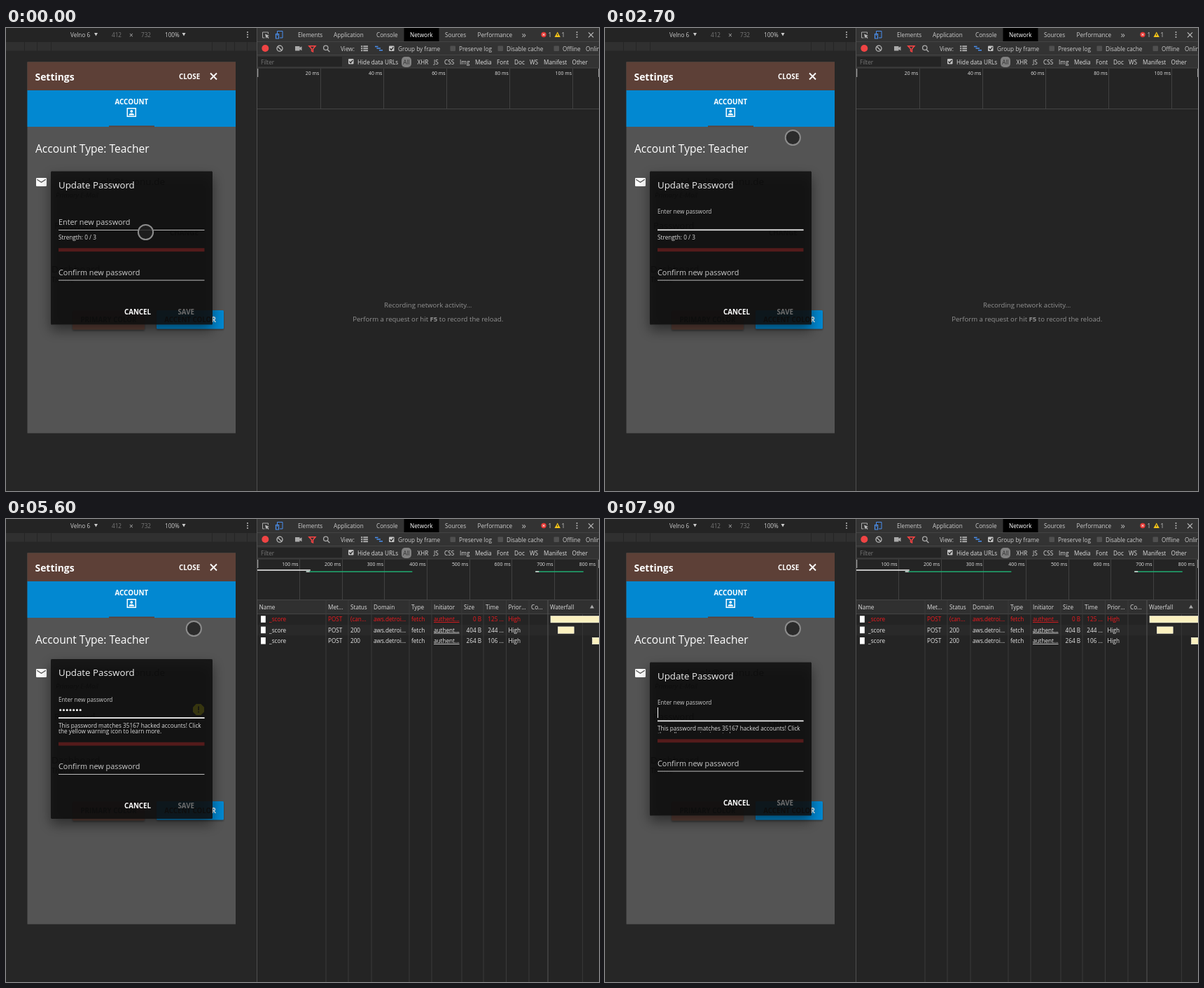
Recreate the animation shown at these times as an HTML page. Size 847 by 661 pixels, loop 8 s.

```html
<!DOCTYPE html>
<html lang="en">
<head>
<meta charset="utf-8">
<title>Password settings</title>
<style>
html, body { margin: 0; width: 100%; height: 100%; overflow: hidden; background: #262626; }
svg { display: block; width: 847px; height: 661px; }
text { font-family: "Open Sans", "Noto Sans", sans-serif; white-space: pre; }
</style>
</head>
<body>
<svg id="stage" viewBox="0 0 847 661" xmlns="http://www.w3.org/2000/svg"></svg>
<script>
const LOOP = 8000;
const text = (x, y, s, size = 8.2, fill = '#ccc', more = '') =>
  `<text x="${x}" y="${y}" font-size="${size}" fill="${fill}" ${more}>${s}</text>`;
const rect = (x, y, w, h, fill, more = '') =>
  `<rect x="${x}" y="${y}" width="${w}" height="${h}" fill="${fill}" ${more}/>`;
const path = (d, stroke, width = 1, more = '') =>
  `<path d="${d}" stroke="${stroke}" stroke-width="${width}" fill="none" ${more}/>`;
const shape = (d, fill) => `<path d="${d}" fill="${fill}"/>`;
const circle = (x, y, r, fill, more = '') => `<circle cx="${x}" cy="${y}" r="${r}" fill="${fill}" ${more}/>`;
const vline = (x, y0, y1, color) => rect(x, y0, 1, y1 - y0, color);
const bold = 'font-weight="700"';
const end = 'text-anchor="end"';
const middle = 'text-anchor="middle"';
const kebab = (x, y) => [-3.6, 0, 3.6].map(d => circle(x, y + d, 1, '#bbb')).join('');
const caretDown = (x, y) => shape(`M${x} ${y}h5l-2.5 4.5z`, '#ccc');
const checkbox = (x, y, on) => rect(x, y, 7.5, 7.5, on ? '#c4c4c4' : '#505050', 'rx="1"') +
  (on ? path(`M${x + 1.5} ${y + 3.8}l1.8 2 3-4`, '#222', 1.3) : '');

function deviceBar() {
  return rect(0, 0, 358, 20, '#242424') + text(92, 12.5, 'Velno 6') + caretDown(126, 7) +
    text(151, 12.5, '412', 8.2, '#777') + text(176, 13.5, '×', 10, '#aaa') + text(193, 12.5, '732', 8.2, '#777') +
    text(227, 12.5, '100%') + caretDown(251.5, 7) + kebab(345, 9.5) +
    rect(0, 20, 358, 12.5, '#303030') +
    [26, 44, 64, 294, 314, 326, 344].map(x => vline(x, 20, 32.5, '#252525')).join('');
}

function phone() {
  const ghost = (x, y, s, size, more) => text(x, y, s, size, '#000', more);
  return rect(30.5, 48.5, 297.5, 530, '#545454') +
    rect(30.5, 48.5, 297.5, 40.5, '#5d4037') + rect(30.5, 89, 297.5, 52, '#0288d1') +
    text(41.5, 74.5, 'Settings', 13.9, '#fff', bold) + text(247, 73, 'CLOSE', 9.75, '#fff', bold) +
    path('M292 64.5l9 9m0-9l-9 9', '#fff', 1.9) +
    text(179.3, 108.5, 'ACCOUNT', 9.85, '#fff', bold + middle) +
    path('M173.3 114.8h12v11.4h-12z', '#fff', 1.5) + circle(179.3, 118.9, 1.9, '#fff') +
    shape('M175.5 124.5q0-2.8 3.8-2.8t3.8 2.8z', '#fff') +
    rect(147, 139.5, 65, 1.7, '#5d4037') +
    text(42, 177.5, 'Account Type: Teacher', 15.6, '#fff') +
    rect(43, 214, 15, 12, '#fff', 'rx="1.3"') + path('M44.3 216.3l6.2 4 6.2-4', '#545454', 1.3) +
    rect(95, 403, 103, 27.5, '#5d4037', 'rx="1.5" filter="url(#lift)"') +
    rect(215, 403, 96, 26.5, '#0288d1', 'rx="1.5" filter="url(#lift)"') +
    ghost(227, 224, 'mirka.olt@tavonu.de', 13.5, end) + ghost(71, 241.5, 'Primary E-Mail', 9.4, 'font-style="italic"') +
    ghost(69, 287, 'Password', 13) + ghost(234, 296, 'CHANGE', 9.75, bold) +
    ghost(65, 349, 'Dashboard', 13.5) + ghost(65, 363, 'Theme', 10) +
    ghost(146.5, 420, 'PRIMARY COLOR', 9.75, bold + middle) +
    ghost(263, 420, 'ACCENT COLO<tspan fill="#fff">R</tspan>', 9.75, bold + middle);
}

function toolbars() {
  const row = (y, items, fill) => items.map(([x, s]) => text(x, y, s, 8.2, fill)).join('');
  const tabs = [[417, 'Elements'], [468, 'Application'], [529, 'Console'], [627, 'Sources'], [673.5, 'Performance']];
  const kinds = [[587.5, 'XHR'], [611, 'JS'], [626, 'CSS'], [648, 'Img'], [670, 'Media'], [701, 'Font'],
    [726, 'Doc'], [748, 'WS'], [768, 'Manifest'], [808.5, 'Other']];
  const options = [[478, 'View:'], [560, 'Group by frame'], [647, 'Preserve log'], [715, 'Disable cache'],
    [795, 'Offline'], [828, 'Online']];
  return rect(359, 0, 488, 57, '#333') + rect(568.5, 0, 50, 19.5, '#000') +
    [19, 38, 56.5].map(y => rect(359, y, 488, 1, '#444')).join('') +
    row(13, tabs) + text(577, 13, 'Network', 8.2, '#fff') + text(736.5, 13.5, '»', 13, '#bbb') +
    path('M374.5 8.5v-2.5h-8v8h3', '#aaa') + shape('M370 8.5l6 2.4-2.4 1 2 2-1 1-2-2-1 2.2z', '#bbb') +
    path('M387.5 11v-6.5h7.5v9.5h-4', '#4a90f0') + path('M385.5 8.5h4v6.5h-4z', '#4a90f0', 1.2) +
    circle(768, 9.5, 3.7, '#e53935') + path('M766.5 8l3 3m0-3l-3 3', '#fff', .9) + text(774.5, 13, '1') +
    shape('M787.7 5.5l4.2 7.5h-8.4z', '#f5c518') + rect(787.2, 8, 1, 3, '#333') + text(793.5, 13, '1') +
    kebab(815.5, 9.5) + path('M832 6.3l7 7m0-7l-7 7', '#bbb', 1.2) +
    circle(370.3, 29, 5, '#ef4444') + circle(391, 29.2, 4, 'none', 'stroke="#bbb" stroke-width="1.3"') +
    path('M388 26.3l6 6', '#bbb', 1.3) + shape('M413 26h6.5v2l3-1.7v6l-3-1.7v2h-6.5z', '#aaa') +
    path('M432.8 25.8h9.2l-3.5 4v4l-2-1v-3z', '#f44', 1.4) +
    circle(456.8, 28.3, 3.2, 'none', 'stroke="#aaa" stroke-width="1.3"') + path('M459 30.8l3.3 3.3', '#aaa', 1.4) +
    [26, 29, 32].map(y => rect(507, y - .8, 2.3, 2, '#aaa') + rect(510.3, y - .8, 6.7, 2, '#aaa')).join('') +
    path('M527 26.5h4.5m-2 2.5h5.5m-2 2.7h5', '#4a90f0', 1.6) +
    checkbox(547, 25.5, true) + [634.5, 702.5, 782.5].map(x => checkbox(x, 25.5)).join('') + row(33, options) +
    rect(360, 41, 120, 14, '#242424') + text(364, 51.8, 'Filter', 8.2, '#777') +
    checkbox(489, 44, true) + text(502, 51.5, 'Hide data URLs', 8.2, '#ddd') +
    rect(565, 41, 14, 15, '#808080', 'rx="5"') + text(572, 51.8, 'All', 8.2, '#303030', middle) + row(52, kinds, '#ddd');
}

function idlePanel() {
  return text(602.7, 399, 'Recording network activity...', 9.6, '#919191', middle) +
    text(602.7, 419, `Perform a request or hit <tspan ${bold}>F5</tspan> to record the reload.`, 9.6, '#919191', middle);
}

// Requests as [start, end, size, duration] in ms after recording begins.
const requests = [[0, 125, '0 B', '125 ...'], [115, 365, '404 B', '244 ...'], [655, 768, '264 B', '106 ...']];

function overview(t) {
  const active = t >= 4300;
  const range = active ? Math.min(803, 135 + Math.max(0, t - 4400) * 1.336) : 108;
  const step = range < 200 ? 20 : range < 420 ? 50 : 100;
  const scale = 487 / range;
  let out = '';
  for (let ms = step; ms <= range + step; ms += step) {
    const x = 359 + ms * scale;
    out += vline(Math.round(x - .5), 57.5, 115, '#414141') + text(x - 2, 67, ms + ' ms', 6.9, '#e4e4e4', end);
  }
  out += rect(359, 58, 1.3, 12, '#999') + rect(846, 58, 1, 12, '#999') + rect(359, 115, 488, 1, '#444');
  if (active) requests.forEach(([a, b], i) => {
    if (a >= range) return;
    const x = 359 + a * scale, w = (Math.min(b, range) - a) * scale;
    if (!i) out += rect(x, 72.2, w, 1.6, '#e6e6e6');
    else if (step > 20) out += rect(x, 74.5, w, 1.5, '#1faa70') + rect(x, 74.5, 5, 1.5, '#ddd');
  });
  return out + (active ? table(range) : idlePanel());
}

function table(range) {
  const heads = [[361.5, 'Name'], [460, 'Met...'], [492, 'Status'], [525, 'Domain'], [579, 'Type'], [611, 'Initiator'],
    [654, 'Size'], [685, 'Time'], [717.5, 'Prior...'], [750, 'Co...'], [777, 'Waterfall']];
  const scale = 73 / range;
  let out = rect(359, 116, 488, 19.5, '#303030') + rect(359, 135, 488, 1, '#444') + rect(359, 151, 488, 15.3, '#292929');
  out += vline(Math.round(778 + (range < 200 ? 100 : 500) * scale), 136, 661, '#363636');
  heads.forEach(([x, s], i) => {
    if (i) out += vline(x - 3.5, 116, 661, i === 10 ? '#565656' : '#3b3b3b');
    out += text(x, 129, s, 8.2, '#ddd');
  });
  out += shape('M834 127.5h6l-3-5z', '#aaa');
  requests.forEach(([a, b, size, time], i) => {
    if (a >= range) return;
    const y = 146.2 + i * 15.4, done = b < range;
    const ink = i ? '#e6e6e6' : '#f0191e', dim = i ? '#888' : ink;
    const put = (x, s, fill = ink, more) => { out += text(x, y, s, 8.2, fill, more); };
    out += rect(364, y - 8, 6.8, 9.6, '#fff');
    put(376, '_score'); put(460, 'POST');
    put(492, done ? (i ? '200' : '(can...') : '(pen...', done ? ink : dim);
    put(525, 'aws.detroi...'); put(579, done || !i ? 'fetch' : 'json');
    put(611, 'authent...', ink, 'text-decoration="underline"');
    put(679, done ? size : '0 B', ink, end);
    put(711, done ? time : 'Pen...', done ? ink : dim, end);
    put(717.5, 'High');
    const x = 778 + a * scale;
    out += rect(x, y - 7.7, i ? (Math.min(b, range) - a) * scale : 69, 9.4, done ? '#fbf1c0' : '#f4f4f4', 'stroke="#fffbe6" stroke-width=".6"');
  });
  return out;
}

const clamp = v => Math.max(0, Math.min(1, v));
const ease = v => { v = clamp(v); return v * v * (3 - 2 * v); };
const FOCUS = 1040, CLEAR = 6800;
const keys = [2900, 3300, 3700, 3900, 4100, 4300, 4700];

function typing(t) {
  const typed = keys.filter(k => k <= t);
  const erased = t < CLEAR ? 0 : Math.min(7, Math.floor((t - CLEAR) / 100));
  const last = erased ? CLEAR + erased * 100 : typed[typed.length - 1] || FOCUS;
  return { dots: typed.length - erased, caret: t >= FOCUS && Math.floor((t - last) / 530) % 2 === 0 };
}

function warning(t) {
  const pulse = .5 + .5 * Math.cos((t - 4970) / 1000 * 2 * Math.PI);
  return `<g opacity="${pulse}">` + shape('M271.7 268.5h6.6l4.7 4.7v6.6l-4.7 4.7h-6.6l-4.7-4.7v-6.6z', '#f2ea00') +
    rect(274.2, 271.8, 1.7, 5.8, '#1a1a1a') + rect(274.2, 279, 1.7, 1.8, '#1a1a1a') + '</g>';
}

function field(t) {
  const lift = ease((t - FOCUS) / 300), { dots, caret } = typing(t);
  let out = text(75, 281 - 16 * lift, 'Enter new password', 10.85 - 2.65 * lift, '#ccc');
  out += rect(75, 288, 208.5, 1, '#bbb');
  if (t >= 4300 && t < 4850) {
    const right = clamp((t - 4250) * .45 / 208.5) * 208.5, left = Math.max(0, (t - 4250) * .45 - 120);
    out += rect(75, 287.3, 208.5, 2, '#123a54') + rect(75 + left, 287.3, right - left, 2, '#0b8fdc');
  } else out += rect(179.2 - 104.2 * lift, 287.4, 208.5 * lift, 1.8, '#e6e6e6');
  for (let i = 0; i < dots; i++) out += circle(77.7 + 4.75 * i, 277.2, 1.55, '#fff');
  if (caret) out += rect(75 + 4.75 * dots, 269, 1, 15, '#fff');
  return out + (t >= 4900 && t < 7700 ? warning(t) : '');
}

function messages(t, grow) {
  const p = ease((t - 4850) / 300), y = 302 - 4 * (1 - p);
  const clip = `<clipPath id="slot">${rect(75, 290, 215, 15.7 + 2 * grow, '#fff')}</clipPath>`;
  return clip + '<g clip-path="url(#slot)">' +
    (p < 1 ? text(75, 302, 'Strength: 0 / 3', 8.25, '#ddd', `opacity="${1 - p}"`) : '') +
    (p > 0 ? `<g opacity="${p}">` + text(75, y, 'This password matches 35167 hacked accounts! Click', 8.25, '#ddd') +
      text(75, y + 8.6, 'the yellow warning icon to learn more.', 8.25, '#ddd') + '</g>' : '') + '</g>';
}

function dialog(t) {
  const grow = 4.4 * (ease((t - 4750) / 200) - ease((t - 7600) / 250));
  return rect(64, 204.5 - grow, 231, 219 + 2 * grow, '#111', 'fill-opacity=".86" rx="1.5" filter="url(#shadow)"') +
    `<g transform="translate(0 ${-grow})">` + text(75, 228.7, 'Update Password', 13.3, '#f0f0f0') +
    field(t) + messages(t, grow) + '</g>' +
    `<g transform="translate(0 ${grow})">` + rect(75, 314.3, 208.5, 4.9, '#541b1b') +
    text(75, 352.7, 'Confirm new password', 10.85, '#ccc') + rect(75, 359.6, 208.5, 1, '#bbb') +
    text(169, 408.5, 'CANCEL', 9.75, '#fff', bold) + text(245.5, 408.5, 'SAVE', 9.75, '#6c6c6c', bold) + '</g>';
}

// Pointer stops as [time, x, y].
const stops = [[0, 199.5, 291.5], [100, 200, 291], [200, 200, 291], [300, 202, 285], [500, 204, 277], [600, 204, 277],
  [800, 202.5, 279.2], [1100, 202.5, 279.2], [1300, 215, 330], [1500, 256, 412], [1600, 279, 380], [1700, 282, 290],
  [1800, 275, 200], [1900, 268.3, 156.5], [LOOP, 268.3, 156.5]];

function pointer(t) {
  const i = stops.findIndex(s => s[0] > t);
  const [t0, x0, y0] = stops[i - 1], [t1, x1, y1] = stops[i];
  const k = (t - t0) / (t1 - t0);
  return circle(x0 + (x1 - x0) * k, y0 + (y1 - y0) * k, 10.6, '#202020', 'fill-opacity=".8" stroke="#8c8c8c" stroke-width="2"');
}

const stage = document.getElementById('stage');
stage.innerHTML = `<defs>
  <filter id="shadow" x="-20%" y="-20%" width="140%" height="150%"><feDropShadow dx="0" dy="8" stdDeviation="9" flood-color="#000" flood-opacity=".55"/></filter>
  <filter id="lift" x="-10%" y="-20%" width="120%" height="160%"><feDropShadow dx="0" dy="1.5" stdDeviation="1.2" flood-color="#000" flood-opacity=".4"/></filter>
  </defs>` + rect(0, 0, 847, 661, '#262626') + rect(359, 0, 488, 661, '#242424') +
  deviceBar() + phone() + toolbars() + vline(358, 0, 661, '#505050') + '<g id="network"></g><g id="form"></g>';
const network = document.getElementById('network');
const form = document.getElementById('form');

let shown = -1;
function draw(now) {
  const t = Math.floor(now % LOOP / 100) * 100;
  if (t !== shown) {
    shown = t;
    network.innerHTML = overview(t);
    form.innerHTML = dialog(t) + pointer(t);
  }
}

const start = performance.now();
function tick() {
  draw(performance.now() - start);
  requestAnimationFrame(tick);
}
tick();
</script>
</body>
</html>
```
